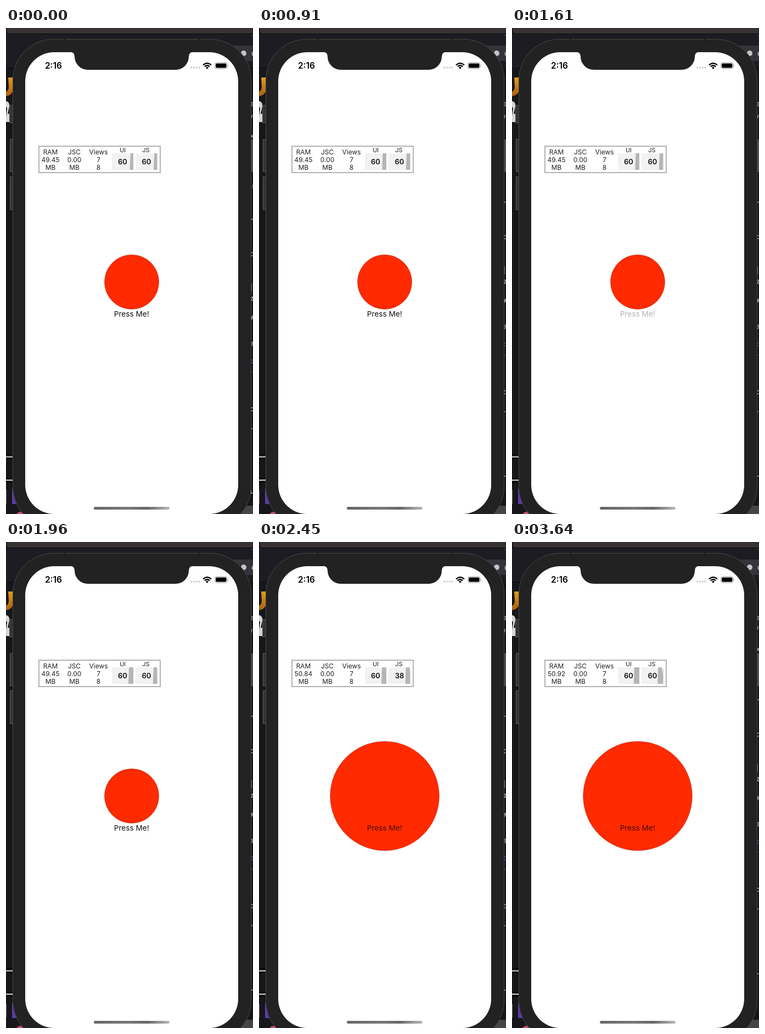
An HTML page that plays this animation: 450 px wide and 884 px high, repeating every 3.71 s.

```html
<!DOCTYPE html>
<html lang="en">
<head>
<meta charset="utf-8">
<title>Press Me</title>
<style>
html, body { margin: 0; width: 100%; height: 100%; overflow: hidden; background: #17161a; }
svg { display: block; width: 450px; height: 884px; font-family: Inter, Roboto, sans-serif; }
.mid { text-anchor: middle; }
.stat { font-size: 11.9px; fill: #222; }
.label { font-size: 11px; fill: #222; }
.fps { font-size: 13px; font-weight: 600; fill: #111; }
.code { font-size: 12px; fill: #dcdcdc; }
</style>
</head>
<body>
<svg viewBox="0 0 450 884">
  <defs>
    <linearGradient id="bar">
      <stop offset="0" stop-color="#666"/><stop offset=".45" stop-color="#777"/>
      <stop offset=".7" stop-color="#666"/><stop offset="1" stop-color="#b8b8b8"/>
    </linearGradient>
    <linearGradient id="gold" x2="0" y2="1">
      <stop offset="0" stop-color="#e39a1c"/><stop offset="1" stop-color="#a85f10"/>
    </linearGradient>
  </defs>

  <!-- desktop behind the phone -->
  <rect width="450" height="884" fill="#17161a"/>
  <rect y="11" width="450" height="61" fill="#1e1c23"/>
  <path d="M0 72.5H450" stroke="#0b0b0d"/>
  <path d="M1 -2V5Q1 10.500 7 10.500H450V-2Z" fill="#383233" stroke="#0c0b0c"/>
  <path d="M446 13.500H450" stroke="#444"/>
  <rect x="410" y="32" width="40" height="28" fill="#35343a"/>
  <circle cx="433" cy="46" r="5" fill="#c4c4c6"/>
  <text x="447" y="51" font-size="14" fill="#ddd">c</text>
  <path d="M4 90H13V112Q11 123 0 124V116Q5 114 5 106Z" fill="url(#gold)"/>
  <path d="M0 133Q7 134 6 143L3 156H8V171H0V160L2 146L0 143Z" fill="#d6d6d6"/>
  <path d="M0 780H13M0 822.500H13" stroke="#000" stroke-width="8"/>
  <path d="M0 780H12M0 822.500H12" stroke="#a5a5a5" stroke-width="3"/>
  <path d="M0 840V865" stroke="#777" stroke-width="2"/>
  <rect x="11" y="838" width="20" height="28" fill="#5a3aa8"/>
  <circle cx="26" cy="887" r="7" fill="#c94f68"/>
  <g id="code" class="code"></g>
  <rect x="425" y="869" width="25" height="15" fill="#454447"/>

  <!-- phone -->
  <g fill="#343434" stroke="#5a5a5a">
    <rect x="6.500" y="140.500" width="8" height="32"/>
    <rect x="7.500" y="202.500" width="8" height="59"/>
    <rect x="7.500" y="270.500" width="8" height="60"/>
    <rect x="443" y="203.500" width="6.500" height="58" fill="#454545"/>
  </g>
  <rect x="12.500" y="20.500" width="434" height="888" rx="74" fill="#222" stroke="#484848"/>
  <path d="M107 20.500v2M352 20.500v2" stroke="#111" stroke-width="3"/>
  <rect x="35" y="44" width="388" height="840" rx="53" fill="#fff"/>
  <path d="M117 43.500Q125 44 125 52A24 24 0 0 0 149 76H309A24 24 0 0 0 333 52Q333 44 341 43.500Z" fill="#222"/>

  <!-- status bar -->
  <text class="mid" x="86.500" y="74" font-size="15.500" font-weight="600">2:16</text>
  <g id="dots" fill="#ccc"></g>
  <g fill="none" stroke="#000" stroke-width="2.300">
    <path d="M359 67.300Q366.500 60.700 374 67.300M361.800 70.200Q366.500 66.200 371.200 70.200"/>
    <path d="M363.800 72Q366.500 69.900 369.200 72L366.500 74.800Z" fill="#000" stroke="none"/>
  </g>
  <rect x="380.500" y="63" width="22.500" height="11" rx="3.300" fill="none" stroke="#999"/>
  <rect x="382" y="64.600" width="19.500" height="7.800" rx="1.800"/>
  <path d="M404 66.500Q405.800 68.500 404 70.500Z" fill="#999"/>

  <!-- performance monitor -->
  <rect x="60" y="215" width="221" height="48" fill="#fff" stroke="#b1b4b4" stroke-width="2"/>
  <g class="mid stat" id="stats"></g>
  <g class="mid label"><text x="212.500" y="226">UI</text><text x="255" y="226">JS</text></g>
  <rect x="193" y="228" width="39" height="30" fill="#f2f2f2"/>
  <rect x="236" y="228" width="39.500" height="30" fill="#f2f2f2"/>
  <path id="uiGraph" fill="#b5b5b5"/>
  <path id="jsGraph" fill="#b5b5b5"/>
  <g class="mid fps"><text x="212.500" y="248">60</text><text x="256" y="248" id="jsFps">60</text></g>

  <!-- app -->
  <circle id="ball" cx="229" cy="462" r="49.500" fill="#ff2a00" stroke="#b8432c" stroke-width=".7"/>
  <text id="press" class="mid" x="228.700" y="525" font-size="13.600">Press Me!</text>
  <rect x="160" y="871" width="138" height="5" rx="2.500" fill="url(#bar)"/>
</svg>
<script>
const LOOP = 3710, STEP = 70;
const $ = id => document.getElementById(id);
const ramp = (t, a, b) => Math.min(1, Math.max(0, (t - a) / (b - a)));
const ease = x => x * x * (3 - 2 * x);
const mix = (a, b, x) => a + (b - a) * x;
const countPast = (t, times) => times.filter(at => t >= at).length;

$('dots').innerHTML = [337.5, 342.3, 347.1, 351.9]
  .map(x => `<circle cx="${x}" cy="72" r="1.7"/>`).join('');

const column = (x, lines) => lines
  .map((s, i) => `<text x="${x}" y="${230 + i * 14}">${s}</text>`).join('');
$('stats').innerHTML = column(81, ['RAM', '49.45', 'MB']) +
  column(124.5, ['JSC', '0.00', 'MB']) + column(168.5, ['Views', '7', '8']);
const ram = $('stats').children[1];

// Log lines peeking out at the right edge
const pinned = [
  [['e', 138], ['/', 163], ['v', 195]],
  [['e', 138], ['/', 163]],
  [['e', 138], ['/', 158], ['x', 195]]
];
const lines = [['ls', 288], ['h', 350], ['c', 411], ['|', 472], ['z', 492],
  ['y', 524], ['a', 574], ['p', 606, '#7d62e8'], ['c', 693], ['r', 731], ['u', 843]];
const glyph = ([s, y, color = '#dcdcdc']) =>
  `<text x="445" y="${y + 4}" fill="${color}">${s}</text>`;
const logs = pinned.map((top, i) => {
  const dy = [0, -31, -61.5][i];
  return top.map(glyph).join('') + `<g transform="translate(0 ${dy})">` +
    lines.map(glyph).join('') +
    '<path d="M445 626H450" stroke="#5b48b0"/><path d="M445 711.5H450" stroke="#050505"/></g>';
});
let shownLog = -1;

function graph(right, values) {
  const n = values.length, dx = 1.3;
  const points = values.map((v, i) =>
    `L${(right - (n - 1 - i) * dx).toFixed(2)} ${(258 - v / 2).toFixed(2)}`);
  return `M${(right - n * dx).toFixed(2)} 258${points.join('')}L${right} 258Z`;
}

function draw(t) {
  const log = countPast(t, [630, 2520]);
  if (log !== shownLog) $('code').innerHTML = logs[shownLog = log];

  const uiTicks = countPast(t, [910, 1960, 2870]);
  const jsTicks = countPast(t, [910, 2030, 3080]);
  const jsValues = [60, 60, 60, 60, 60, 60, 38, 60].slice(0, 5 + jsTicks);
  $('uiGraph').setAttribute('d', graph(232, Array(5 + uiTicks).fill(60)));
  $('jsGraph').setAttribute('d', graph(275.5, jsValues));
  $('jsFps').textContent = jsValues[jsValues.length - 1];
  ram.textContent = ['49.45', '49.45', '50.84', '50.92'][jsTicks];

  const big = t >= 2030;
  $('ball').setAttribute('r', big ? 99.3 : 49.5);
  const fade = ease(ramp(t, 1150, 1320)) - ease(ramp(t, 1540, 1800));
  $('press').setAttribute('opacity', mix(1, 0.18, fade));
  $('press').setAttribute('fill', big ? '#490d03' : '#111');
}

function tick(now) {
  draw(Math.floor((now % LOOP) / STEP) * STEP);
  requestAnimationFrame(tick);
}
draw(0);
requestAnimationFrame(tick);
</script>
</body>
</html>
```
